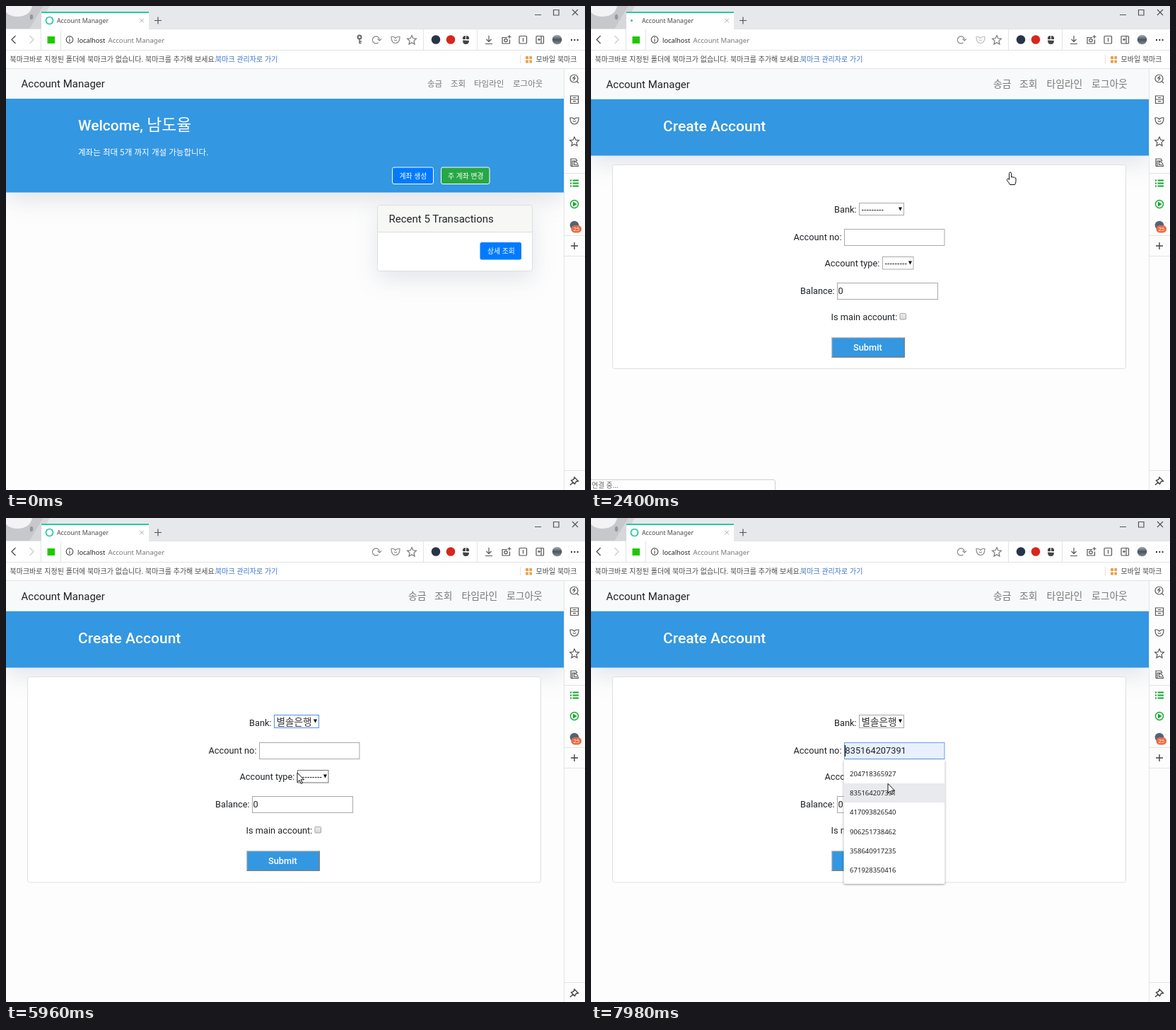
Write an HTML page that moves like this. It is 819 by 684 pixels and loops after 8000 ms.

```html
<!DOCTYPE html>
<html lang="ko">
<head>
<meta charset="utf-8">
<title>Account Manager</title>
<style>
html, body { margin: 0; width: 100%; height: 100%; overflow: hidden; background: #fdfdfd; }
svg { display: block; }
text { font: 10px "Noto Sans CJK KR", "Noto Sans CJK JP", "Noto Sans CJK", sans-serif; fill: #4a4a4a; white-space: pre; }
text.ui { font-family: "Noto Sans", sans-serif; }
text.rb { font: 12.8px Roboto, sans-serif; fill: #212529; }
text.h2 { font: 500 21px Roboto, "Noto Sans CJK KR", sans-serif; fill: #fff; }
.h2 tspan { font-size: 22.8px; font-weight: 400; }
text.h5 { font: 15px Roboto, sans-serif; fill: #212529; }
text.btn { font-size: 9.8px; fill: #fff; }
text.dash { font: 10.5px "Liberation Sans", Arial, sans-serif; fill: #000; }
text.opt { font-size: 13.6px; fill: #333; }
.nav text { fill: #777; }
.home.nav text { font-size: 11.5px; }
.create.nav text { font-size: 13.8px; }
.i { fill: none; stroke: #555; stroke-width: 1.2; }
.g { stroke: #12a82c; }
.line { stroke: #e2e3e5; }
.field { fill: #fff; stroke: #a9a9a9; }
.field.focus { stroke: #6a9fe8; }
.field.filled { fill: #e8f0fe; }
.blue { fill: #3397e2; }
.deep { filter: drop-shadow(0 11px 16px rgba(45, 60, 100, .13)); }
.pop { filter: drop-shadow(0 1px 1.5px rgba(0, 0, 0, .4)); }
</style>
</head>
<body>
<svg width="819" height="684" viewBox="0 0 819 684">
<defs>
  <path id="star" d="M0-6.4 1.9-2.2 6.4-1.7 3 1.4 4 6 0 3.7-4 6-3 1.4-6.4-1.7-1.9-2.2Z"/>
  <path id="fin" d="M-6-4C-3-5-1-3 0-2 1-3 3-5 6-4 6 2 4 5 0 5S-6 2-6-4ZM-2 0Q0 3 2 0"/>
  <path id="plus" d="M-5 0H5M0-5V5"/>
  <path id="cross" d="M-4-4 4 4M4-4-4 4"/>
  <path id="down" d="M-2.5-2.5H2.5L0 2.5Z"/>
  <linearGradient id="dusk" x2="0" y2="1"><stop stop-color="#aab3bf"/><stop offset=".5" stop-color="#4c555f"/><stop offset="1" stop-color="#828a92"/></linearGradient>
  <linearGradient id="tick" x2="0" y2="1"><stop stop-color="#eee"/><stop offset="1" stop-color="#d8d8d8"/></linearGradient>
</defs>

<rect width="819" height="684" fill="#fdfdfd"/>

<!-- welcome page -->
<g id="home">
  <rect class="blue deep" y="131" width="789" height="132.5"/>
  <rect y="88" width="789" height="43" fill="#f8f9fa"/>
  <text class="h5" x="21.5" y="115">Account Manager</text>
  <g class="home nav">
    <text x="596" y="114">송금</text><text x="629" y="114">조회</text>
    <text x="662" y="114">타임라인</text><text x="717" y="114">로그아웃</text>
  </g>
  <text class="h2" x="102" y="176">Welcome, <tspan>남도율</tspan></text>
  <text x="102" y="211" style="font-size:11.5px;fill:#fff">계좌는 최대 5개 까지 개설 가능합니다.</text>
  <rect id="ring" x="544.5" y="226" width="62" height="27.5" rx="4.5" fill="#268fff" opacity=".6"/>
  <rect id="open" x="546.5" y="228" width="58" height="23.5" rx="2.5" stroke="#fff"/>
  <text class="btn" x="556.5" y="243.5">계좌 생성</text>
  <rect id="swap" x="615.5" y="228" width="68.5" height="23.5" rx="2.5" stroke="#fff"/>
  <text class="btn" x="625" y="243.5">주 계좌 변경</text>
  <rect class="deep" x="526" y="281.5" width="218.5" height="93" rx="3" fill="#fff"/>
  <path d="M526 319V284.5Q526 281.5 529 281.5H741.5Q744.5 281.5 744.5 284.5V319Z" fill="#f7f7f5"/>
  <path d="M526 319.5H744.5" stroke="#dcdcdc"/>
  <rect x="525.5" y="281.5" width="219" height="93" rx="3" fill="none" stroke="#dedede"/>
  <text class="h5" x="541.5" y="306">Recent 5 Transactions</text>
  <rect x="670.5" y="334" width="58.5" height="24.5" rx="2.5" fill="#007bff"/>
  <text class="btn" x="681" y="350">상세 조회</text>
</g>

<!-- form page -->
<g id="create">
  <rect class="blue deep" y="131.5" width="789" height="80"/>
  <rect y="88" width="789" height="43.5" fill="#f8f9fa"/>
  <text class="h5" x="21.5" y="116">Account Manager</text>
  <g class="create nav">
    <text x="569" y="114.5">송금</text><text x="606" y="114.5">조회</text>
    <text x="644.5" y="114.5">타임라인</text><text x="708" y="114.5">로그아웃</text>
  </g>
  <text class="h2" x="102" y="177">Create Account</text>
  <rect id="card" x="30.5" y="224.5" width="726" rx="3" fill="#fff" stroke="#dfdfdf"/>
  <g id="form">
    <text class="rb" x="344" y="291.5">Bank:</text>
    <text class="rb" x="286.5" y="331">Account no:</text>
    <rect id="no" class="field" x="358.5" y="315.5" width="141.5" height="23"/>
    <text class="rb" x="330.5" y="368">Account type:</text>
    <rect id="type" class="field" x="412.5" y="354.5" width="43.5" height="17.5"/>
    <text class="dash" x="415.5" y="367">---------</text>
    <use href="#down" x="451.5" y="363"/>
    <text class="rb" x="296" y="407">Balance:</text>
    <rect class="field" x="348.5" y="391.5" width="142" height="23"/>
    <text class="rb" x="349.5" y="407">0</text>
    <text class="rb" x="339.5" y="444">Is main account:</text>
    <rect x="437" y="434.5" width="8.5" height="8.5" rx="1" fill="url(#tick)" stroke="#a5a5a5"/>
    <rect x="340" y="468" width="104" height="29" fill="#7b8087"/>
    <path d="M340 497V468H444L442.5 469.5H341.5V495.5Z" fill="#bcc3cb"/>
    <rect class="blue" x="341.5" y="469.5" width="101" height="26"/>
    <text class="rb" x="371" y="486.5" style="fill:#fff;font-weight:500">Submit</text>
  </g>
  <rect id="bank" x="379.5" y="278.5" width="63" fill="#fff"/>
  <text id="none" class="dash" x="382.5" y="290.5">---------</text>
  <text id="chosen" class="opt" x="382.5" y="293">별솔은행</text>
  <use href="#down" x="437.5" y="287"/>
  <g id="list"><rect x="379.5" y="295.5" width="63" height="127" fill="#fff" stroke="#6b9fdc"/></g>
  <text id="value" class="rb" x="359.5" y="333"></text>
  <path id="caret" d="M359.5 321V337" stroke="#000"/>
  <g id="popup"><rect class="pop" x="357.5" y="341.5" width="143" height="175.5" rx="2" fill="#fff"/></g>
</g>

<!-- status bubble -->
<g id="status">
  <path d="M-1 685V669.5H258Q260.5 669.5 260.5 672V685Z" fill="#fefefe" stroke="#cfcfcf"/>
  <text id="note" x="1" y="681" style="font-size:9.7px;fill:#666"></text>
</g>

<!-- title bar -->
<rect width="819" height="33" fill="#e7e8ec"/>
<path d="M0 0H53L33 33H0Z" fill="#c7c8cb"/>
<path d="M53 0H62L50 20V33H33Z" fill="#d6d7da"/>
<path d="M0 0H37Q34 14 17 15 6 15 0 9Z" fill="#f3f3f5"/>
<ellipse cx="36" cy="15.5" rx="2.3" ry="3.7" fill="#96979c"/>
<rect x="50" y="8" width="152" height="25" fill="#fff"/>
<rect x="50" y="8" width="152" height="2" fill="#28c9a9"/>
<circle id="site" cx="61.5" cy="20.5" r="5" fill="none" stroke="#25c5a5" stroke-width="1.7"/>
<g id="dots" fill="#25c5a5"><circle cx="57.5" cy="20.5"/><circle cx="61.5" cy="20.5"/><circle cx="65.5" cy="20.5"/></g>
<text class="ui" x="72" y="23.5" style="font-size:8.8px">Account Manager</text>
<g class="i">
  <use href="#cross" transform="translate(192 20.5) scale(.7)" stroke="#999"/>
  <use href="#plus" x="215" y="20.5"/>
  <path d="M748 12.5H757M774.5 5.5H782V13H774.5Z"/>
  <use href="#cross" x="805" y="9"/>
</g>

<!-- address bar -->
<rect y="32.5" width="819" height="56" fill="#fff"/>
<path class="line" d="M0 32.5H50M202 32.5H819M0 62.5H819M0 88.5H819M49.5 33V62M77.5 33V62M590.5 33V62M666.5 33V62M727.5 69V81"/>
<rect x="58.5" y="43" width="10.5" height="10" fill="#1ec800"/>
<g class="i">
  <path d="M13.5 42 8 47.5 13.5 53" stroke-width="1.4"/>
  <path d="M33.5 42 39 47.5 33.5 53" stroke="#ccc"/>
  <circle cx="90" cy="47.5" r="4.8"/><path d="M90 46.5V50.5M90 44V45.3"/>
  <g id="key" stroke="#666"><circle cx="500" cy="44" r="2.5" stroke-width="2"/><path d="M500 46V53M500 50H503M500 52.5H502.5" stroke-width="1.5"/></g>
  <path d="M526.5 51.8A5 5 0 1 1 528.3 47.500M525.500 46.500 528.300 49 531 46.500" stroke="#888"/>
  <use id="pocket" href="#fin" x="551" y="47.5" stroke="#888"/>
  <use href="#star" x="574" y="48" stroke="#777"/>
  <path d="M683 42V50M679.5 47 683 50.5 686.5 47M678 53.5H688"/>
  <path d="M709 44.5H702V53H712.5V47.5M712 41V46M709.5 43.5H714.5"/><circle cx="707" cy="48.5" r="2.2"/>
  <rect x="726" y="42.5" width="10.5" height="10.5" rx="1"/><path d="M731.5 45V50.5"/>
  <rect x="750" y="42.5" width="10.5" height="10.5" rx="1"/><path d="M757 42.5V53M752 47.5H756M754 45.5V49.5"/>
  <path d="M799 48H810" stroke="#333" stroke-width="2" stroke-dasharray="2 2.3"/>
</g>
<circle cx="608" cy="47.5" r="6.3" fill="#28344a"/>
<circle cx="629" cy="47.5" r="6.3" fill="#d8261c"/>
<path d="M646 47V45Q646 42 650.5 42T655 45V47ZM646 48.5H655Q655 54 650.5 54T646 48.5" fill="#444"/>
<path d="M650.5 42V48H655" stroke="#fff" fill="none"/>
<circle cx="779.5" cy="47.5" r="6.8" fill="url(#dusk)"/>
<text class="ui" x="101" y="51.5" style="font-size:9.3px;fill:#222">localhost</text>
<text class="ui" x="144.5" y="51.5" style="font-size:9.6px;fill:#777">Account Manager</text>
<text x="5.5" y="78.5">북마크바로 지정된 폴더에 북마크가 없습니다. 북마크를 추가해 보세요.</text>
<text x="296" y="78.5" style="fill:#3a74c8">북마크 관리자로 가기</text>
<path d="M735 73H744M735 78.5H744" stroke="#e9a04e" stroke-width="4" stroke-dasharray="4 1.3"/>
<text x="749.5" y="78.5">모바일 북마크</text>

<!-- sidebar -->
<rect x="789" y="89" width="30" height="595" fill="#fdfdfd"/>
<path class="line" d="M789.5 89V684M790 236.5H819M790 324.5H819M790 353.5H819M790 656.5H819"/>
<g class="i">
  <circle cx="803.5" cy="102.5" r="5.5"/><path d="M805 99 802 102H805L802.5 105.5M807.5 106.5 810 109"/>
  <path d="M798.5 127H809.5V137.5H798.5ZM798.5 132H809.5M802 129.5H806M802 134.7H806"/>
  <use href="#fin" x="804" y="162"/>
  <use href="#star" x="804" y="191.5"/>
  <path d="M799 226.5V216H806L808 219M801 226.5V219H808M799 226.5H809.5Q809 220 803.5 220V224.5H808"/>
  <path class="g" d="M798 246.5H800M798 250.5H800M798 254.5H800M801.5 246.5H810M801.5 250.5H810M801.5 254.5H810" stroke-width="2.2"/>
  <circle class="g" cx="804" cy="280" r="5.5" stroke-width="1.4"/><path class="g" d="M802.5 277.5V282.5L806.5 280Z" fill="#12a82c"/>
  <use href="#plus" x="804" y="339" stroke="#444" stroke-width="1.4"/>
  <path d="M804 666 809.5 671.5 806.5 672 804.5 675.5 799.5 670.5 803 669ZM802 673 798 677" stroke="#444" stroke-width="1.4"/>
</g>
<circle cx="804" cy="310" r="6.3" fill="#506478"/>
<rect x="799.5" y="310" width="14.5" height="10.5" rx="5" fill="#ef6a45"/>
<text class="ui" x="802.5" y="318.3" style="font-size:7.5px;fill:#fff">25</text>

<!-- pointers -->
<g id="pointer" stroke-linejoin="round" stroke="#111" fill="#fff">
  <path id="arrow" d="M0 0V13.5L3.2 10.6 5.4 15.5 7.4 14.6 5.2 9.8H9.5Z"/>
  <path id="hand" d="M-1.5 9.500V.5Q-1.5-1 0-1T1.500.5V6Q3 4.800 4 6.200 5.500 5.200 6.500 6.800 8 6.500 8 8V11.500Q8 14 6.500 16.500H-.5Q-1.500 14-4.500 10.500-4.800 8.300-3.500 8-2.500 8-1.500 9.500Z"/>
  <path id="beam" d="M-3-6.5H-1L0-5.5 1-6.5H3M0-5.5V5.5M-3 6.5H-1L0 5.5 1 6.5H3" fill="none"/>
</g>
</svg>
<script>
const LOOP = 8000;
const $ = id => document.getElementById(id);
const show = (id, on) => { $(id).style.display = on ? '' : 'none'; };
const set = (id, attrs) => { for (const k in attrs) $(id).setAttribute(k, attrs[k]); };
const within = (t, a, b) => t >= a && t < b;

function add(parent, tag, attrs, text = '') {
  const el = document.createElementNS('http://www.w3.org/2000/svg', tag);
  for (const k in attrs) el.setAttribute(k, attrs[k]);
  el.textContent = text;
  return $(parent).appendChild(el);
}

const banks = ['---------', '보듬', '들녘', '별솔은행', '달빛은행', '솔잎은행', '물결은행'];
const numbers = ['204718365927', '835164207391', '417093826540', '906251738462', '358640917235', '671928350416'];
const ROW = 18.15, LINE = 27.2;

const listBar = add('list', 'rect', { x: 380, width: 62, height: 17.5, fill: '#1e90ff' });
const options = banks.map((name, i) => add('list', 'text', {
  class: i ? 'opt' : 'dash', x: 383.5, y: i ? 309 + i * ROW : 307.5
}, name));
const popupBar = add('popup', 'rect', { x: 358, width: 142, height: LINE, fill: '#e8eaed' });
numbers.forEach((n, i) => add('popup', 'text', {
  class: 'ui', x: 366, y: 365 + i * LINE, style: 'font-size:9.55px;fill:#222'
}, n));

// pointer legs: start, end, steps, from x, y, to x, y
const legs = [
  [670, 1450, 11, 740, 668, 593, 236],
  [3310, 3850, 8, 588, 240, 432, 281],
  [4710, 5010, 5, 431, 287, 402, 353],
  [5320, 5320, 1, 408, 355, 408, 355],
  [5490, 5490, 1, 414, 358, 414, 358],
  [5960, 6200, 4, 412, 360, 428, 341],
  [6350, 6350, 1, 428, 339, 428, 339],
  [7750, 7980, 4, 428, 345, 420, 375.3]
];

function pointerAt(t) {
  const leg = legs.filter(l => l[0] <= t).pop();
  if (!leg) return null;
  const [a, b, n, x0, y0, x1, y1] = leg;
  const p = t >= b ? 1 : Math.floor((t - a) / (b - a) * (n - 1) + 1e-6) / (n - 1);
  const e = p * p * (3 - 2 * p);
  return { x: x0 + (x1 - x0) * e, y: y0 + (y1 - y0) * e };
}

function draw(t) {
  const pos = pointerAt(t);
  const over = (x, y, w, h) => !!pos && within(pos.x, x, x + w) && within(pos.y, y, y + h);
  const home = t < 2400, loading = within(t, 1680, 2470), picked = t >= 5490;
  show('home', home);
  show('create', !home);

  const onOpen = over(546, 228, 59, 24), onSwap = over(615, 228, 69, 24);
  set('open', { fill: onOpen ? '#0069d9' : '#007bff' });
  set('swap', { fill: onSwap ? '#218838' : '#28a745' });
  show('ring', t >= 1680);

  // browser state
  show('site', !loading);
  show('dots', loading);
  const phase = Math.floor((t - 1680) / 79) % 8;
  [...$('dots').children].forEach((dot, i) =>
    dot.setAttribute('r', Math.max(0, Math.min(1.5, (phase + 1 - 2 * i) * .8))));
  show('key', t < 1680);
  set('pocket', { opacity: within(t, 1680, 2700) ? .55 : 1 });
  show('status', within(t, 1520, 2930));
  set('status', { opacity: t < 2850 ? 1 : .5 });
  $('note').textContent = t < 1680 ? 'localhost:8000/accounts/create/' : t < 2700 ? '연결 중...' : '';

  // form
  set('form', { transform: `translate(0 ${picked ? 2 : 0})` });
  set('card', { height: picked ? 290.5 : 288 });
  set('bank', { height: picked ? 18 : 17, stroke: within(t, 3850, 6500) ? '#4f8fdf' : '#a9a9a9' });
  show('none', !picked);
  show('chosen', picked);
  $('type').style.stroke = picked && over(411, 356, 46, 19) ? '#707070' : '';

  const open = within(t, 3930, 5490);
  show('list', open);
  if (open) {
    const row = Math.max(0, Math.floor((pos.y - 295.5) / ROW));
    listBar.setAttribute('y', 295.5 + row * ROW);
    options.forEach((el, i) => { el.style.fill = i === row ? '#fff' : ''; });
  }

  // suggestions
  const focus = t >= 6500;
  const line = t >= 7750 ? Math.floor((pos.y - 347.8) / LINE) : -1;
  show('popup', t >= 6670);
  popupBar.style.display = line < 0 ? 'none' : '';
  popupBar.setAttribute('y', 347.8 + Math.max(0, line) * LINE);
  $('value').textContent = line < 0 ? '' : numbers[line];
  $('no').classList.toggle('focus', focus);
  $('no').classList.toggle('filled', line >= 0);
  show('caret', focus && !within(t, 7050, 7600));

  // pointer
  show('pointer', pos);
  if (!pos) return;
  set('pointer', { transform: `translate(${pos.x} ${pos.y})` });
  const hand = t < 3310 && (onOpen || onSwap || t >= 1450), beam = within(t, 6200, 7750);
  show('hand', hand);
  show('beam', beam);
  show('arrow', !hand && !beam);
}

function tick() {
  draw(performance.now() % LOOP);
  requestAnimationFrame(tick);
}
tick();
</script>
</body>
</html>
```
